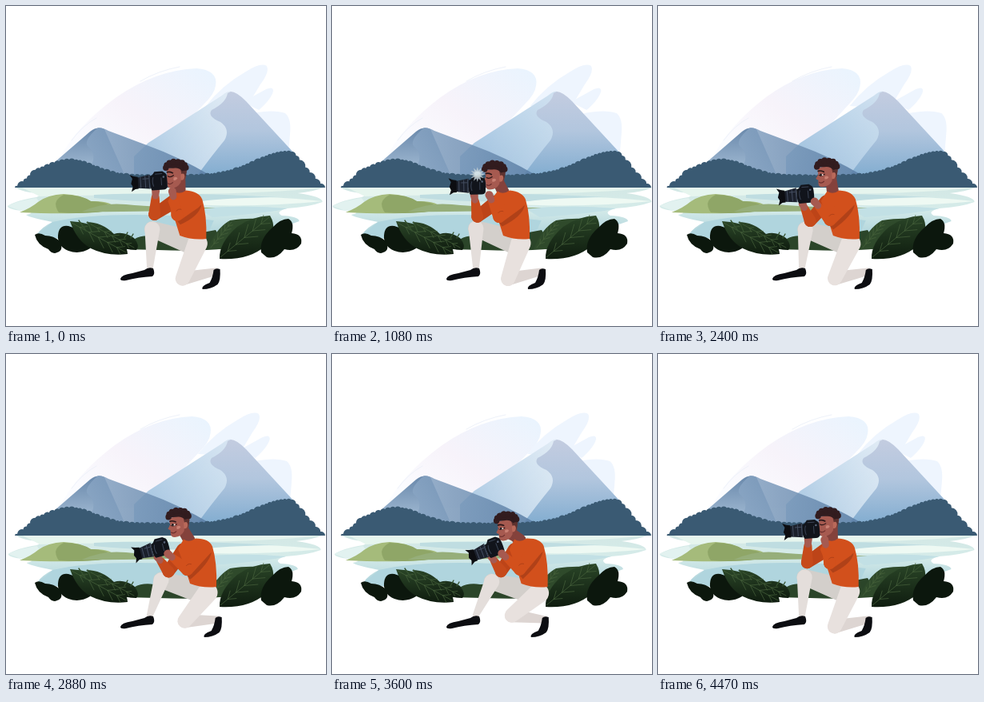
Animation, 400 px wide and 400 px high, one loop 4.5 s. Source, as an HTML page:

```html
<!DOCTYPE html>
<html lang="en">
<head>
<meta charset="utf-8">
<title>Photographer by the lake</title>
<style>
html,body{margin:0;width:100%;height:100%;overflow:hidden;background:#fff}
svg{display:block;width:100vw;height:100vh}
</style>
</head>
<body>
<svg id="stage" viewBox="0 0 400 400">
<defs>
<linearGradient id="sky" x1="0" y1=".9" x2="1" y2=".1"><stop offset=".1" stop-color="#fbfcff"/><stop offset=".5" stop-color="#f7f3fa"/><stop offset="1" stop-color="#eaf4fe"/></linearGradient>
<linearGradient id="hillA" x1="0" y1="0" x2="0" y2="1"><stop offset="0" stop-color="#6988ab"/><stop offset="1" stop-color="#abc3da"/></linearGradient>
<linearGradient id="hillB" x1="0" y1=".6" x2="1" y2=".6"><stop offset="0" stop-color="#8aa6c4"/><stop offset="1" stop-color="#587ca3"/></linearGradient>
<linearGradient id="peakA" x1="0" y1="1" x2="1" y2="0"><stop offset="0" stop-color="#94b9da"/><stop offset=".6" stop-color="#b8d2e8"/><stop offset="1" stop-color="#cfe0f0"/></linearGradient>
<linearGradient id="peakB" x1="0" y1="0" x2="0" y2="1"><stop offset="0" stop-color="#c3cce0"/><stop offset=".45" stop-color="#b2c6de"/><stop offset="1" stop-color="#7fabcf"/></linearGradient>
<linearGradient id="glow" x1="0" y1="0" x2="1" y2="0"><stop offset="0" stop-color="#fff" stop-opacity=".2"/><stop offset="1" stop-color="#fff" stop-opacity=".75"/></linearGradient>
<linearGradient id="lake" x1="0" y1="0" x2="0" y2="1"><stop offset="0" stop-color="#d3e8e5"/><stop offset=".35" stop-color="#d5ebe9"/><stop offset="1" stop-color="#9ec9d6"/></linearGradient>
<linearGradient id="leaf" x1="0" y1="0" x2="0" y2="1"><stop offset="0" stop-color="#2a4527"/><stop offset="1" stop-color="#0f1c0f"/></linearGradient>
<clipPath id="bodyClip"><path id="bodyCut"/></clipPath>
</defs>

<g id="skyMain"><path fill="url(#sky)" d="M66 192Q88 150 138 114Q187 80 238 78Q265 80 262 99Q261 110 246 124L180 192Z"/></g>
<g fill="none" stroke="#eef2fa" stroke-linecap="round"><path d="M168 94Q190 81 217 76"/><path d="M82 168Q95 150 113 140"/></g>
<g fill="#eef5fe">
<path id="cloudTop" d="M250 125Q270 99 300 82Q319 70 326 75Q330 82 318 98L300 128Z"/>
<path id="cloudMid" d="M296 120L325 104Q334 100 334 106Q332 116 316 130Z"/>
<path id="cloudLow" d="M308 134Q335 129 349 134Q357 141 355 160L353 184L320 176Z"/>
</g>

<path fill="url(#peakA)" d="M160 188L178 171L270 112Q277 106 282 107L300 215H160Z"/>
<path id="shine" fill="url(#glow)" d="M160 188L178 171L270 112Q277 106 282 107L290 215H160Z"/>
<path fill="url(#peakB)" d="M281 107Q288 107 300 119L362 186V216H236Q258 186 273 168Q281 154 268 145Q251 138 257 130Q275 121 277 109Z"/>
<path fill="url(#hillA)" d="M60 196L105 157Q114 150 123 154L150 215H50Z"/>
<path fill="url(#hillB)" d="M115 152Q121 152 128 156L176 174Q215 188 256 212L96 214Q118 190 104 177Q94 170 115 152Z" opacity=".85"/>
<path id="trees" fill="#3a5a73"/>

<g id="water">
<path fill="url(#lake)" d="M12 227L397 227Q385 232 365 234Q396 238 396 245Q380 251 352 253Q336 257 345 262Q366 263 367 269Q350 276 320 280L260 302L100 297L38 286Q45 276 58 270Q28 264 25 261Q40 258 20 256Q2 254 2 250Q12 243 38 239Q48 235 30 233Q18 231 12 227Z"/>
<path fill="#e6f5ee" d="M20 227H396Q330 234 230 235Q120 236 42 238Z"/>
<path fill="#eef9f3" d="M190 239Q300 234 396 244Q310 253 205 247Z"/>
<path fill="#bfdde1" d="M110 236Q210 232 340 239Q270 240 245 244Q170 246 110 240Z"/>
<path fill="#c2e0e5" d="M240 253Q300 248 352 253Q330 259 258 264Z"/>
<path fill="#b0d5de" d="M58 270Q110 258 205 262L260 268L250 290H60L40 285Z"/>
<path fill="#e2f2f0" d="M2 250Q12 244 38 240L45 250Q25 257 18 256Z"/>
</g>
<path fill="#a5bb7b" d="M17 258Q32 252 40 245Q52 236 72 235Q94 236 106 244Q133 243 137 254Q100 262 17 258Z"/>
<path fill="#8fa667" d="M66 258Q56 244 72 236Q94 236 106 244Q126 244 138 254Q108 261 66 258Z"/>
<path fill="#96ae7a" d="M95 257Q120 245 150 248Q190 252 262 252Q200 258 95 257Z"/>

<g id="plants">
<path fill="#2b4529" d="M148 304Q160 284 185 288Q225 288 262 280L276 303Q240 307 190 305Z"/>
<path fill="#0c170d" d="M36 286Q41 282 49 287Q60 287 67 294Q73 305 64 308Q58 311 53 304Q39 299 36 286Z"/>
<path fill="#0c170d" d="M65 287Q66 273 78 275Q91 278 98 290Q108 294 105 303Q92 311 78 306Q64 300 65 287Z"/>
<path fill="url(#leaf)" d="M80 269Q106 270 128 283Q151 293 152 310Q126 313 106 303Q88 293 80 269Z"/>
<path fill="url(#leaf)" d="M100 270Q120 270 135 285Q147 281 160 290Q168 300 163 305Q134 305 100 270Z"/>
<path fill="#2f4a2b" d="M252 304Q262 278 280 268Q306 264 322 267L296 304Z"/>
<path fill="url(#leaf)" d="M267 316Q266 296 289 276Q307 263 330 262Q341 280 324 300Q304 318 267 316Z"/>
<path fill="#0c170d" d="M319 308Q316 292 333 277Q343 266 353 266Q361 270 357 284Q371 285 369 297Q362 308 348 304Q338 317 326 314Z"/>
</g>
<g id="man"></g>
</svg>
<script>
const LOOP = 4500;
const $ = id => document.getElementById(id);
const man = $('man');

function add(tag, attrs, parent = man) {
  const el = document.createElementNS('http://www.w3.org/2000/svg', tag);
  for (const k in attrs) el.setAttribute(k, attrs[k]);
  return parent.appendChild(el);
}
const path = (fill, d = '', parent = man) => add('path', {fill, d}, parent);
const line = (stroke, width, d = '', parent = man) =>
  add('path', {fill: 'none', stroke, 'stroke-width': width, 'stroke-linecap': 'round', d}, parent);
const dot = (fill, cx, cy, r, parent) => add('circle', {fill, cx, cy, r}, parent);
const place = (el, x, y, r = 0) => el.setAttribute('transform', `translate(${x} ${y}) rotate(${r})`);
const scaleX = (el, x, s) => el.setAttribute('transform', `translate(${x} 0) scale(${s} 1) translate(${-x} 0)`);
const wave = (t, peak, turns = 1) => Math.cos(2 * Math.PI * turns * (t - peak) / LOOP);
const clamp = v => Math.min(1, Math.max(0, v));
const shift = (p, x, y) => [p[0] + x, p[1] + y];
const mix = (a, b, k) => [a[0] + (b[0] - a[0]) * k, a[1] + (b[1] - a[1]) * k];

let seed = 7;
const rnd = () => (seed = seed * 16807 % 2147483647) / 2147483647;

// two wooded humps that fall to the shore at both ends
function ridge(x) {
  const hump = (c, w) => Math.exp(-(((x - c) / w) ** 2));
  const edge = Math.min(1, (x - 11) / 25, (399 - x) / 40);
  return 227 - edge * (15 + 20 * hump(80, 43) + 30 * hump(352, 58));
}
let crown = 'M11 227';
for (let x = 11, y = 227; x < 399;) {
  const nx = Math.min(399, x + 3 + 5 * rnd()), ny = ridge(nx);
  const r = .65 * Math.hypot(nx - x, ny - y);
  crown += `A${r} ${r} 0 0 1 ${nx} ${ny}`;
  [x, y] = [nx, ny];
}
$('trees').setAttribute('d', crown + 'Z');

// midrib with pairs of side veins
function veins(a, b, size) {
  let d = `M${a}L${b}`;
  const ang = Math.atan2(b[1] - a[1], b[0] - a[0]);
  for (let k = .15; k < .9; k += .17) {
    const p = mix(a, b, k), l = size * Math.sin(Math.PI * (k * .8 + .1));
    for (const s of [-.6, .6]) d += `M${p}l${l * Math.cos(ang + s)} ${l * Math.sin(ang + s)}`;
  }
  line('#48633d', .7, d, $('plants'));
}
veins([82, 271], [150, 308], 15);
veins([106, 273], [160, 302], 9);
veins([268, 314], [329, 264], 17);
veins([256, 302], [282, 270], 9);
line('#35512f', 1.4, 'M100 281L91 268M107 282L102 270M148 290L152 283M156 290L159 285', $('plants'));

const skin = '#a65a50', skinDark = '#84423c', cloth = '#d2501c', clothDark = '#b04118';
const pants = '#e8e1de', ink = '#0c0d11', hairTone = '#321c1f';

const thigh1 = path('#d3cfcb'), calf1 = path('#e4dedb');
path(ink, 'M143 341Q144 336 158 334L173 330Q178 326 184 328Q187 335 183 338Q165 339 150 343Q143 344 143 341Z');
const shin2 = path('#ddd5d2');
const shoe2 = path(ink, 'M-17 21Q-19 17 -8 13Q-4 6 -3 -3Q0 -6 5 -4Q6 10 2 15Q-6 21 -17 21Z');
const thigh2 = path(pants);
const upper1 = path('#bd4418'), lower1 = path('#c64a1b');
const neck = path(skinDark);
const body = path(cloth);
const shade = path(clothDark);
shade.setAttribute('clip-path', 'url(#bodyClip)');

const head = add('g', {});
path(skinDark, 'M-3 -9L12 -10Q14 1 10 9L3 15L-6 10Z', head);
path(skin, 'M-11 -9Q-12 -4 -11 -1Q-13 3 -14 4Q-13 6 -11 6L-11 10Q-11 15 -6 15Q2 15 6 8L8 -6L2 -12Z', head);
path('#5e322f', 'M5 -12H13Q15 -5 11 3L8 5L7 -3Z', head);
path('#b9695a', 'M6 -2Q11 -5 11 1Q10 6 6 5Z', head);
path('#c98073', 'M-3 2Q1 0 2 3Q0 6 -3 5Z', head);
path(hairTone, 'M-14 -10Q-10 -19 2 -19Q15 -18 14 -8L8 -6Q4 -11 -3 -10Z', head);
for (let a = 0; a <= Math.PI; a += Math.PI / 7)
  dot(hairTone, -12.5 * Math.cos(a), -10.5 - 7.5 * Math.sin(a), 3.2 + rnd(), head);
line('#2b1719', 1.7, 'M-11 -5Q-8 -6 -4 -4', head);
line('#2f1819', 1.2, 'M-10 0Q-7 2 -3 -1', head);
const eye = add('g', {}, head);
path('#f4e7e2', 'M-10 -.5Q-7 -3 -4 0Q-7 2 -10 -.5Z', eye);
dot('#22191c', -7.8, -.4, 1.5, eye);
line('#6d302e', 1.2, 'M-10 9Q-7 11 -4 8', head);

const hand1 = path(skin);
const cam = add('g', {});
path('#11141b', 'M-11 -7L-8 -8L-5 -12H5L9 -9Q11 -6 10 8Q9 11 5 11H-9Q-12 9 -11 -7Z', cam);
path('#1b202b', 'M-27 -6L-11 -9V9L-27 7Z', cam);
path(ink, 'M-36 -10L-31 -8L-26 -7V8L-30 8L-35 11L-33 5L-35 1L-33 -5Z', cam);
line('#465064', .9, 'M-23 -6V7M-17 -7V7M-12 -8V8M-20 -4H-13', cam);
line('#3a4354', 1, 'M-4 -9H4M-7 -5Q-9 0 -7 6M3 -4V5', cam);
dot('#59657a', 6, -5, 1.3, cam);

const upper2 = path(cloth), lower2 = path(cloth), hand2 = path(skin);
const crease = line(clothDark, 1);
const flash = add('g', {});
let star = 'M';
for (let i = 0; i < 24; i++) {
  const a = i * Math.PI / 12, r = i % 2 ? 5 : 9.5;
  star += `${r * Math.cos(a)} ${r * Math.sin(a)} `;
}
path('#c3d0d6', star + 'Z', flash);
dot('#e4eeee', 0, 0, 4, flash);

// tapered capsule from a to b
function limb(el, a, b, ra, rb) {
  const dx = b[0] - a[0], dy = b[1] - a[1], l = Math.hypot(dx, dy) || 1;
  const at = (p, r) => `${p[0] - dy / l * r} ${p[1] + dx / l * r}`;
  el.setAttribute('d', `M${at(a, ra)}L${at(b, rb)}A${rb} ${rb} 0 0 0 ${at(b, -rb)}L${at(a, -ra)}A${ra} ${ra} 0 0 0 ${at(a, ra)}Z`);
}
function arm(upper, lower, hand, s, e, h) {
  limb(upper, s, e, 9, 7.5);
  limb(lower, e, mix(e, h, .72), 7.5, 5);
  limb(hand, mix(e, h, .78), h, 4.2, 5);
}

function scenery(t) {
  scaleX($('skyMain'), 80, 1 + .03 * (wave(t, 4200) - .9));
  place($('cloudTop'), 5.5 * (wave(t, 350) - .9), 0);
  place($('cloudMid'), 3.5 * (wave(t, 900) - .3), 0);
  place($('cloudLow'), 5 * (wave(t, 1600) + .62), 0);
  scaleX($('water'), 110, 1 + .012 * wave(t, 1200));
  $('shine').setAttribute('opacity', .35 + .3 * wave(t, 4000));
}

function person(t) {
  // the crouch moves the whole body, the camera leads both arms
  const low = ((1 + wave(t, 3400)) / 2) ** 3;
  const sway = 24 * low;
  const c = [189.5 + 11 * wave(t, 3650) + 3 * wave(t, 3600, 2), 230.5 + 12 * wave(t, 2900) + 4.5 * wave(t, 1250, 2)];
  const lift = (241 - c[1]) / 23;
  const face = [211 + 8 * wave(t, 3500), 214 + 1.5 * wave(t, 3700) + 2.5 * wave(t, 3600, 2)];

  const hip = [232 + sway, 297.5 + 2.5 * low];
  const knee1 = [180 + 21 * low, 278 + 7 * low];
  const knee2 = [220 + 5 * low, 341 - 16 * low * low];
  const foot = [262 + 4 * low, 333];
  const n = [216 + .93 * sway, 230.5];
  const s = [240 + sway, 239 - 2 * low];
  const b = [204 + sway, 242];
  const h1 = shift(c, -4, 12), h2 = shift(c, 9 + 8 * lift, 8 + 5 * lift);
  const e1 = shift(mix(b, h1, .5), -2 - 10 * lift, 24);
  const e2 = shift(mix(s, h2, .5), -3 - 9 * lift, 26);

  limb(thigh1, shift(hip, -3, -2), knee1, 15, 10);
  limb(calf1, knee1, [180, 326], 9.5, 4);
  limb(shin2, knee2, shift(foot, 0, -1), 8.5, 4.5);
  place(shoe2, ...foot);
  limb(thigh2, shift(hip, 4, -1), knee2, 12.5, 9);

  arm(upper1, lower1, hand1, shift(b, 2, 3), e1, h1);
  limb(neck, shift(face, 5, 6), shift(n, -2, 2), 7, 7.5);

  const d = `M${b[0] - 5} ${b[1] + 2}Q${b[0]} ${b[1] - 7} ${n[0] - 9} ${n[1] + 1}Q${n[0] - 2} ${n[1] + 6} ${n[0] + 6} ${n[1]}`
    + `Q${s[0] - 2} ${s[1] - 7} ${s[0] + 2} ${s[1] + 3}Q${s[0] + 8} ${s[1] + 23} ${hip[0] + 15} 291`
    + `Q${hip[0] - 2} 293 ${hip[0] - 18} 287Q${b[0] + 4} 265 ${b[0] - 5} ${b[1] + 2}Z`;
  body.setAttribute('d', d);
  $('bodyCut').setAttribute('d', d);
  shade.setAttribute('d', `M${s[0] + 1} ${s[1] + 10}Q${s[0] - 2} ${s[1] + 24} ${e2[0] + 4} ${e2[1] + 12}L${e2[0] - 3} ${e2[1] + 4}Z`);

  place(head, ...face, -5 * low);
  eye.setAttribute('opacity', clamp((.68 - lift) * 8));
  place(cam, ...c, -1 - 21 * low);
  arm(upper2, lower2, hand2, shift(s, -8, 6), e2, h2);
  crease.setAttribute('d', `M${e2[0] + 5} ${e2[1] - 7}q-4 -1 -6 2`);

  const pop = clamp(1 - Math.abs(t - 1080) / 120);
  flash.setAttribute('transform', `translate(${c[0]} ${c[1] - 14}) scale(${pop})`);
  flash.setAttribute('opacity', .85 * pop);
}

function tick() {
  const t = performance.now() % LOOP;
  scenery(t);
  person(t);
  requestAnimationFrame(tick);
}
tick();
</script>
</body>
</html>
```
